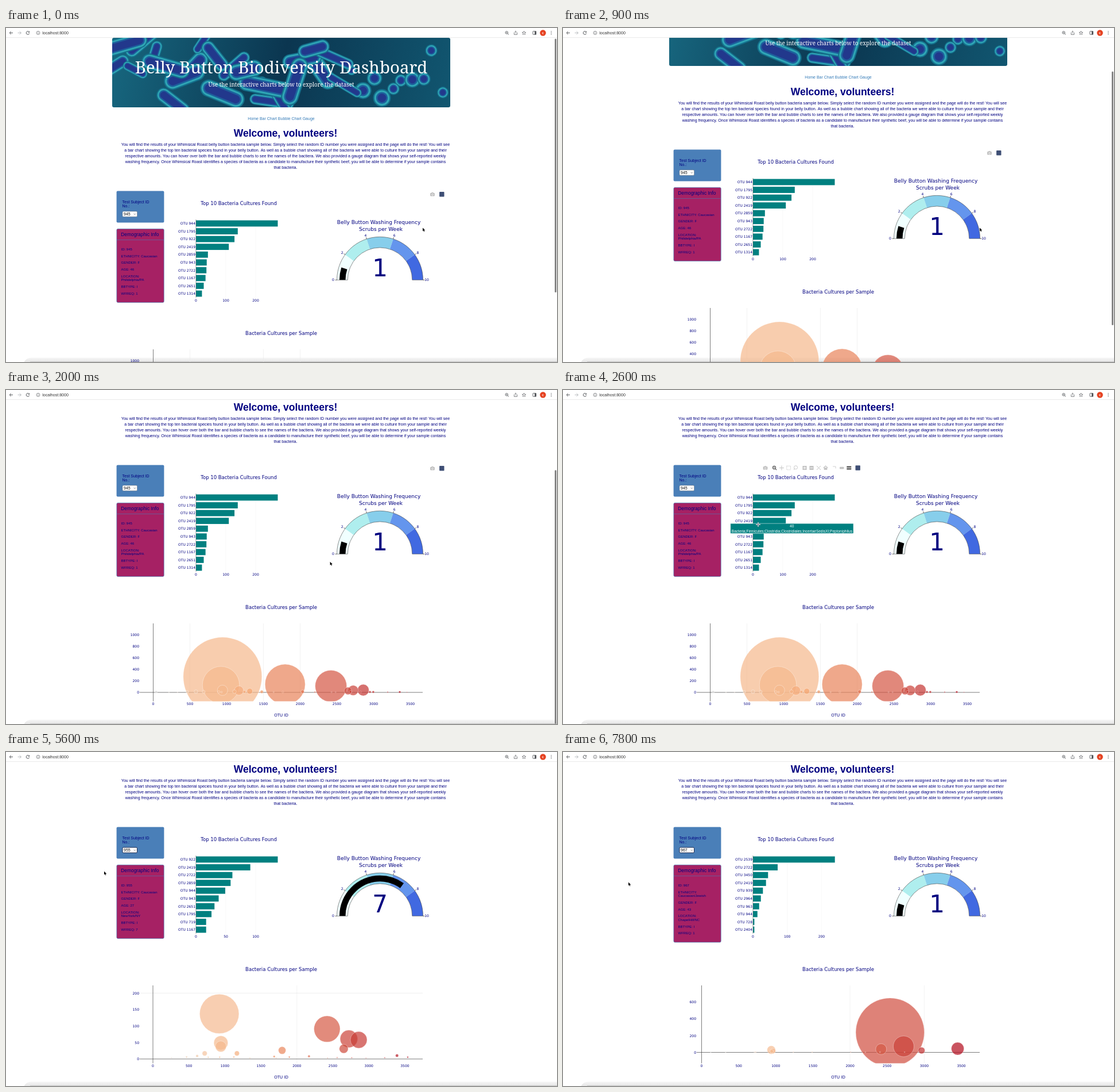
An HTML page with a canvas for the animation above (8 s loop, 960 px wide and 581 px high).

```html
<!DOCTYPE html>
<html lang="en">
<head>
<meta charset="utf-8">
<title>Dashboard</title>
<style>
  html, body { margin: 0; width: 100%; height: 100%; overflow: hidden; background: #fff; }
  canvas { display: block; width: 960px; height: 581px; }
</style>
</head>
<body>
<canvas id="stage"></canvas>
<script>
const W = 960, H = 581, LOOP = 8000, STEP = 100;
const SANS = '"Liberation Sans", Arial, sans-serif';
const PLOT = '"DejaVu Sans", Verdana, sans-serif';
const SERIF = '"Noto Serif", Georgia, serif';
const NAVY = '#000080', TEAL = '#008080', STEEL = '#4a7fb8', PLUM = '#a62164';
const canvas = document.getElementById('stage');
const g = canvas.getContext('2d');
const dpr = window.devicePixelRatio || 1;
canvas.width = W * dpr;
canvas.height = H * dpr;

const INTRO = [
  'You will find the results of your Whimsical Roast belly button bacteria sample below. Simply select the random ID number you were assigned and the page will do the rest! You will see',
  'a bar chart showing the top ten bacterial species found in your belly button. As well as a bubble chart showing all of the bacteria we were able to culture from your sample and their',
  'respective amounts. You can hover over both the bar and bubble charts to see the names of the bactiera. We also provided a gauge diagram that shows your self-reported weekly',
  'washing frequency. Once Whimsical Roast identifies a species of bacteria as a candidate to manufacture their synthetic beef, you will be able to determine if your sample contains',
  'that bacteria.'
];

function seeded(seed) {
  return () => {
    seed = (seed + 0x6d2b79f5) | 0;
    let r = Math.imul(seed ^ (seed >>> 15), 1 | seed);
    r = (r + Math.imul(r ^ (r >>> 7), 61 | r)) ^ r;
    return ((r ^ (r >>> 14)) >>> 0) / 4294967296;
  };
}

// minor cultures are spread over the id range with small counts
function minors(n, lo, hi, peak, seed) {
  const rnd = seeded(seed);
  return span(0, n - 1).map(i => {
    const jitter = i && i < n - 1 ? rnd() - 0.5 : 0;
    return [lo + (hi - lo) * (i + jitter) / (n - 1), 3 + peak * rnd() ** 2];
  });
}

const span = (a, b, skip = []) => {
  const out = [];
  for (let i = a; i <= b; i++) if (!skip.includes(i)) out.push(i);
  return out;
};

const SUBJECTS = [
  {
    id: 945, freq: 1, ethnicity: ['ETHNICITY: Caucasian'], age: 46, place: 'Philidelphia/PA',
    otu: [944, 1795, 922, 2419, 2859, 943, 2722, 1167, 2651, 1314],
    count: [274, 140, 129, 110, 40, 36, 35, 32, 26, 20],
    minor: minors(26, 41, 3454, 12, 5),
    barStep: 100, barScale: 0.52,
    x0: 256.5, xs: 0.128, y0: 679, ys: 0.1, yStep: 200, yMax: 1000, gridX: [500, 1500, 2000], gridY: []
  },
  {
    id: 955, freq: 7, ethnicity: ['ETHNICITY: Caucasian'], age: 27, place: 'NewYork/NY',
    otu: [922, 2419, 2722, 2859, 944, 943, 2651, 1795, 719, 1167],
    count: [137, 91, 61, 58, 49, 38, 31, 26, 17, 17],
    minor: minors(19, 41, 3540, 9, 8),
    barStep: 50, barScale: 1.04,
    x0: 256, xs: 0.1254, y0: 687, ys: 0.573, yStep: 50, yMax: 200, gridX: [2000], gridY: [200]
  },
  {
    id: 967, freq: 1, ethnicity: ['ETHNICITY:', 'Caucasian/Jewish'], age: 43, place: 'ChapelHill/NC',
    otu: [2539, 2722, 3450, 2419, 939, 2964, 963, 944, 728, 2404],
    count: [239, 72, 44, 38, 29, 23, 18, 13, 4, 4],
    minor: minors(8, 123, 2735, 0, 3),
    barStep: 100, barScale: 0.597,
    x0: 241.5, xs: 0.1293, y0: 675.5, ys: 0.1458, yStep: 200, yMax: 600, gridX: [2000, 3000], gridY: []
  }
];

const IDS = [...span(940, 978, [942, 951, 957, 965, 976, 977]), ...span(1233, 1250, [1240, 1241])];
const ROW = 11.414;

// time, then value or position
const SCROLL = [[300, 0], [900, 72], [1300, 129], [1700, 153]];
const CURSOR = [
  [1600, 727, 351], [2500, 340, 234], [2900, 340, 234], [3500, 216, 171], [3700, 216, 171],
  [4200, 218, 275], [4600, 218, 275], [5600, 172, 211], [5700, 172, 211],
  [6300, 215, 171], [6600, 215, 171], [7100, 217, 285], [7400, 217, 285], [7800, 115, 230]
];
const MENUS = [
  { open: 3600, blink: 4400, close: 4500, pick: 945 },
  { open: 6500, blink: 7300, close: 7400, pick: 955 }
];

const smooth = u => u * u * (3 - 2 * u);

function track(keys, t, ease = u => u) {
  if (t <= keys[0][0]) return keys[0].slice(1);
  for (let i = 1; i < keys.length; i++) {
    const a = keys[i - 1], b = keys[i];
    if (t <= b[0]) {
      const u = ease((t - a[0]) / (b[0] - a[0]));
      return a.slice(1).map((v, k) => v + (b[k + 1] - v) * u);
    }
  }
  return keys[keys.length - 1].slice(1);
}

// y is the middle of the capitals
function text(s, x, y, size, { align = 'left', font = SANS, color = NAVY, weight = '' } = {}) {
  g.font = `${weight} ${size}px ${font}`;
  g.textAlign = align;
  g.fillStyle = color;
  g.fillText(s, x, y + size * 0.36);
}

function line(color, width, ...pts) {
  g.strokeStyle = color;
  g.lineWidth = width;
  g.beginPath();
  for (let i = 0; i < pts.length; i += 2) g.lineTo(pts[i], pts[i + 1]);
  g.stroke();
}

function paint(fill, stroke, lw) {
  if (fill) { g.fillStyle = fill; g.fill(); }
  if (stroke) { g.strokeStyle = stroke; g.lineWidth = lw; g.stroke(); }
}

function box(x, y, w, h, r, fill, stroke, lw = 0.6) {
  g.beginPath();
  g.roundRect(x, y, w, h, r);
  paint(fill, stroke, lw);
}

function disc(x, y, r, fill, stroke, lw = 0.6) {
  g.beginPath();
  g.arc(x, y, r, 0, Math.PI * 2);
  paint(fill, stroke, lw);
}

function clipTo(x, y, w, h, r = 0) {
  g.beginPath();
  g.roundRect(x, y, w, h, r);
  g.clip();
}

function banner() {
  const rnd = seeded(21);
  g.save();
  clipTo(185, 17, 589, 121, 3);
  const bg = g.createLinearGradient(185, 17, 774, 138);
  bg.addColorStop(0, '#17677f');
  bg.addColorStop(0.5, '#0b3650');
  bg.addColorStop(1, '#115670');
  g.fillStyle = bg;
  g.fillRect(185, 17, 589, 121);
  g.lineCap = 'round';
  const layers = [[1, '#14708c'], [0.86, '#2fa6b5'], [0.66, '#1d5f9c'], [0.48, '#22388c']];
  for (let i = 0; i < 34; i++) {
    const x = 185 + 589 * ((i * 0.618) % 1), y = 17 + 121 * rnd();
    const round = x > 600, w = 16 + 16 * rnd();
    const a = (rnd() - 0.5) * 2.6, len = round ? 0.1 : 30 + 35 * rnd();
    const dx = len / 2 * Math.cos(a), dy = len / 2 * Math.sin(a);
    for (const [k, color] of layers) line(color, w * k, x - dx, y - dy, x + dx, y + dy);
  }
  g.restore();
  const white = { align: 'center', font: SERIF, color: '#fff' };
  text('Belly Button Biodiversity Dashboard', 479.5, 68.7, 29.4, white);
  text('Use the interactive charts below to explore the dataset', 479.5, 98.4, 9.85, white);
}

function sidebar(s, focused) {
  box(192.6, 283.4, 82.8, 55.2, 2, STEEL);
  text('Test Subject ID', 202.5, 302, 7);
  text('No.:', 202.5, 309.7, 7);
  box(203, 319, 25.5, 9.3, 1.5, '#fff', focused ? '#1b2b50' : '#777', focused ? 1 : 0.5);
  text(s.id, 205, 323.7, 7, { color: '#111' });
  line('#444', 0.6, 222.6, 322.8, 224.3, 324.6, 226, 322.8);

  const extra = (s.ethnicity.length - 1) * 6.6;
  box(192.9, 349.4, 82.3, 128 + extra, 2, PLUM, STEEL, 0.7);
  text('Demographic Info', 200.3, 359, 8.4);
  line(STEEL, 0.6, 193, 368.6, 275, 368.6);
  const items = [['ID: ' + s.id], s.ethnicity, ['GENDER: F'], ['AGE: ' + s.age],
    ['LOCATION:', s.place], ['BBTYPE: I'], ['WFREQ: ' + s.freq]];
  let y = 385;
  for (const rows of items) {
    rows.forEach((r, i) => text(r, 200.5, y + i * 6.6, 6));
    y += 11.65 + (rows.length - 1) * 6.6;
  }
}

function barChart(s) {
  text('Top 10 Bacteria Cultures Found', 405.5, 305, 8.5, { align: 'center', font: PLOT });
  for (let v = 0; v * s.barScale < 142; v += s.barStep) {
    const x = 331 + v * s.barScale;
    if (v) line('#f1f1f1', 0.5, x, 333, x, 469);
    text(v, x, 473.5, 6, { align: 'center', font: PLOT });
  }
  s.otu.forEach((id, i) => {
    const y = 340 + i * 13.56;
    g.fillStyle = TEAL;
    g.fillRect(331, y - 5.4, s.count[i] * s.barScale, 10.8);
    text('OTU ' + id, 330, y, 6, { align: 'right', font: PLOT });
  });
  line('#444', 0.5, 331, 333, 331, 469);
}

function gauge(s) {
  const cx = 651.5, cy = 438.3, rIn = 56.3, rOut = 75;
  const center = { align: 'center', font: PLOT };
  const angle = v => Math.PI * (1 + v / 10);
  const sector = (a, b, r0, r1, fill, stroke) => {
    g.beginPath();
    g.arc(cx, cy, r1, angle(a), angle(b));
    g.arc(cx, cy, r0, angle(b), angle(a), true);
    g.closePath();
    paint(fill, stroke, 0.6);
  };
  text('Belly Button Washing Frequency', 649.5, 337.7, 9, center);
  text('Scrubs per Week', 653, 349.5, 9, center);
  ['#f0ffff', '#afeeee', '#87ceeb', '#6495ed', '#4169e1'].forEach((c, i) => sector(i * 2, i * 2 + 2, rIn, rOut, c));
  sector(0, s.freq, 60, 70.6, '#000');
  sector(0, 10, rIn, rOut, null, '#444');
  for (let v = 0; v <= 10; v += 2) {
    const c = Math.cos(angle(v)), n = Math.sin(angle(v));
    line('#222', 0.7, cx + 75 * c, cy + 75 * n, cx + 78 * c, cy + 78 * n);
    text(v, cx + 81.5 * c, cy + 81.5 * n, 6, center);
  }
  text(s.freq, cx, 416.8, 42, center);
}

const REDS = [[0, 220, 220, 220], [0.2, 245, 195, 157], [0.4, 245, 160, 105], [1, 178, 10, 28]];
const shade = u => `rgba(${track(REDS, u).map(Math.round)},0.7)`;

function bubbleChart(s) {
  const px = v => s.x0 + v * s.xs, py = v => s.y0 - v * s.ys;
  const top = 559, bottom = 694.5, left = 235, right = 726;
  text('Bacteria Cultures per Sample', 479.5, 531, 8.5, { align: 'center', font: PLOT });
  for (const v of s.gridX) line('#eaeaea', 0.6, px(v), top, px(v), bottom);
  for (const v of s.gridY) line('#e4e4e4', 0.6, left, py(v), right, py(v));
  line('#444', 0.7, 233, s.y0, right, s.y0);
  line('#444', 0.7, s.x0, top, s.x0, bottom);

  const dots = [...s.otu.map((id, i) => [id, s.count[i]]), ...s.minor];
  const ids = dots.map(d => d[0]);
  const lo = Math.min(...ids), hi = Math.max(...ids);
  g.save();
  clipTo(left, top, right - left, bottom - top);
  for (const [id, n] of dots) {
    disc(px(id), py(n), n / 4, shade((id - lo) / (hi - lo)), 'rgba(255,255,255,0.7)', 0.5);
  }
  g.restore();

  for (let v = 0; v <= 3500; v += 500) text(v, px(v), 699, 6, { align: 'center', font: PLOT });
  for (let v = 0; v <= s.yMax; v += s.yStep) text(v, 232, py(v), 6, { align: 'right', font: PLOT });
  text('OTU ID', 479.5, 718, 7, { align: 'center', font: PLOT });
}

function camera(x, y) {
  box(x - 3.8, y - 2.3, 7.6, 5.4, 1, '#bdbdbd');
  box(x - 1.6, y - 3.3, 3.2, 2, 0.5, '#bdbdbd');
  disc(x, y + 0.4, 1.5, '#bdbdbd', '#fff', 0.7);
}

const badge = (x, y) => box(x - 4.2, y - 4.2, 8.4, 8.4, 0.8, '#3f4f75');

function plus(x, y, r, color, width) {
  line(color, width, x - r, y, x + r, y);
  line(color, width, x, y - r, x, y + r);
}

function barTools(y) {
  const c = '#c4c4c4', dark = '#5a5a5a';
  camera(352.5, y);
  disc(368, y - 0.5, 2.6, null, dark, 1.1);
  line(dark, 1.2, 370, y + 1.5, 372.2, y + 3.7);
  plus(368, y - 0.5, 1.4, dark, 0.7);
  plus(381, y, 4, c, 1);
  g.setLineDash([1.5, 1]);
  box(389.8, y - 3.3, 6.6, 6.6, 0, null, c, 0.9);
  g.setLineDash([]);
  disc(405.5, y - 0.8, 3, null, c, 0.9);
  line(c, 0.9, 403, y + 1, 402.6, y + 3.6);
  for (const x of [421, 433]) {
    box(x - 3.6, y - 3.6, 7.2, 7.2, 0.5, c);
    line('#fff', 1, x - 2.2, y, x + 2.2, y);
  }
  line('#fff', 1, 421, y - 2.2, 421, y + 2.2);
  for (const d of [-3.5, 3.5]) line(c, 1, 442, y - d, 449, y + d);
  line(c, 1.4, 453.8, y, 457.5, y - 3.4, 461.2, y);
  box(454.7, y - 0.4, 5.6, 3.8, 0, c);
  line(c, 0.8, 470, y - 2.5, 475, y - 2.5, 475, y + 1);
  box(482, y - 1.8, 7.5, 3.8, 1, c);
  for (const d of [-3, 0.5]) box(494.3, y + d, 8, 2.5, 0.4, dark);
  badge(513.7, y);
}

function tooltip() {
  box(291.8, 385.2, 214.2, 17.4, 0, TEAL, '#fff', 0.5);
  const o = { align: 'center', color: '#fff' };
  text('40', 398.7, 390, 6.5, o);
  text('Bacteria;Firmicutes;Clostridia;Clostridiales;IncertaeSedisXI;Peptoniphilus', 399, 398.2, 6.5, o);
}

function menu(m, t, cy) {
  const first = 171 - IDS.indexOf(m.pick) * ROW;
  const top = Math.max(18, first - 8.5), bottom = 580;
  g.save();
  g.shadowColor = 'rgba(0,0,0,0.3)';
  g.shadowBlur = 5 * dpr;
  box(198, top, 35.5, bottom - top, 3, '#e5e4e9');
  g.restore();

  g.save();
  clipTo(198, top, 35.5, bottom - top, 3);
  // the panels behind shine through
  g.filter = `blur(${8 * dpr}px)`;
  box(170, 130, 90, 60, 0, '#c3d7ed');
  box(170, 196, 90, 128, 0, '#f0b4dd');
  g.filter = 'none';
  clipTo(198, top, 35.5, 572 - top);
  const hot = t < m.blink ? Math.round((cy - first) / ROW) : -1;
  IDS.forEach((id, i) => {
    const y = first + i * ROW;
    if (i === hot) box(200.5, y - ROW / 2, 30.5, ROW, 2, '#3f83f6');
    const color = i === hot ? '#fff' : '#1c1c1e';
    text(id, 210, y, 7.2, { color });
    if (id === m.pick) line(color, 0.9, 203.4, y + 0.2, 205, y + 2.2, 207.8, y - 2.4);
  });
  g.restore();
  line('#222', 0.9, 213.4, 573.8, 215.6, 576, 217.8, 573.8);
}

function pointer(x, y, cross) {
  if (cross) {
    plus(x, y, 3.8, '#fff', 2);
    plus(x, y, 3.8, '#667', 0.9);
    return;
  }
  g.beginPath();
  for (const [a, b] of [[0, 0], [0, 6], [1.4, 4.8], [2.4, 7], [3.3, 6.6], [2.4, 4.5], [4.2, 4.4]]) g.lineTo(x - 1 + a, y - 3.5 + b);
  g.closePath();
  paint(null, '#fff', 1);
  paint('#000');
}

function toolbar() {
  const c = '#55585c', y = 8.5;
  g.fillStyle = '#fff';
  g.fillRect(0, 0, W, 17);
  line('#dcdcdc', 0.6, 0, 16.6, W, 16.6);
  const arrow = (x, d, color) => {
    line(color, 0.9, x - 3, y, x + 3, y);
    line(color, 0.9, x, y - 2.8, x + 2.9 * d, y, x, y + 2.8);
  };
  arrow(9, -1, c);
  arrow(23.5, 1, '#b5b8bb');
  g.beginPath();
  g.arc(38, y, 2.8, 0.3, 5.5);
  paint(null, c, 1);
  line(c, 0.9, 40.8, 5.5, 40.8, 7.6, 38.6, 7.6);
  disc(56, y, 2.9, null, c, 0.7);
  line(c, 0.7, 56, 8, 56, 10);
  line(c, 0.7, 56, 6.5, 56, 7.2);
  text('localhost:8000', 63.2, 8.6, 7.1, { color: '#333' });
  disc(872.3, 8, 2.3, null, c, 0.8);
  line(c, 0.9, 874, 9.7, 876, 11.6);
  plus(872.3, 8, 1.2, c, 0.6);
  line(c, 0.7, 886, 8, 885.3, 8, 885.3, 11.5, 890.5, 11.5, 890.5, 8, 889.8, 8);
  line(c, 0.7, 887.9, 9.6, 887.9, 5.2);
  line(c, 0.7, 886.5, 6.6, 887.9, 5.2, 889.3, 6.6);
  g.beginPath();
  for (let i = 0; i < 10; i++) {
    const r = i % 2 ? 1.5 : 3.4, a = -Math.PI / 2 + i * Math.PI / 5;
    g.lineTo(902.5 + r * Math.cos(a), 8.7 + r * Math.sin(a));
  }
  g.closePath();
  paint(null, c, 0.7);
  box(918, 5.7, 5.6, 5.6, 0.5, null, c, 0.9);
  box(921, 5.7, 2.6, 5.6, 0, c);
  disc(935.5, 8.5, 5.2, '#e5401f');
  text('K', 935.5, 8.6, 5.5, { align: 'center', color: '#fff' });
  for (const d of [-2.5, 0, 2.5]) disc(950, y + d, 0.65, c);
}

function bottomEdge() {
  const fade = g.createLinearGradient(0, 573, 0, 581);
  fade.addColorStop(0, '#f7f7f7');
  fade.addColorStop(1, '#e6e6e6');
  box(30, 573.5, W, 30, [14, 0, 0, 0], fade);
  line('#b4b4b4', 0.7, 42, 580.6, W, 580.6);
}

function draw(t) {
  const [scroll] = track(SCROLL, t);
  const [cx, cy] = track(CURSOR, t, smooth);
  const s = SUBJECTS[t < 4600 ? 0 : t < 7500 ? 1 : 2];
  const open = MENUS.find(m => t >= m.open && t < m.close);
  const pageY = cy + scroll;
  const inRow = !open && pageY > 283 && pageY < 505;
  const overBars = inRow && cx > 285 && cx < 525;
  const overGauge = inRow && cx > 535 && cx < 770;
  const inPlot = overBars && cx > 331 && cx < 475 && pageY > 333 && pageY < 469;

  g.setTransform(dpr, 0, 0, dpr, 0, 0);
  g.lineCap = 'butt';
  g.fillStyle = '#fff';
  g.fillRect(0, 0, W, H);
  bottomEdge();

  g.save();
  g.translate(0, -scroll);
  banner();
  text('Home Bar Chart Bubble Chart Gauge', 479.5, 157.5, 7, { align: 'center', color: '#337ab7' });
  text('Welcome, volunteers!', 487, 183, 17.5, { align: 'center', weight: 'bold' });
  INTRO.forEach((row, i) => text(row, 487, 202.5 + i * 10.05, 7.1, { align: 'center' }));
  sidebar(s, t >= 4500);
  barChart(s);
  gauge(s);
  bubbleChart(s);
  if (overGauge) { camera(743, 289.3); badge(759.3, 289.3); }
  if (overBars) barTools(288.5);
  if (inPlot && cx < 352 && Math.abs(pageY - 394) < 9) tooltip();
  g.restore();

  toolbar();
  if (t < 2300) box(956, 18.5 + scroll * 0.79, 3, 441.5, 1.5, '#858585');
  if (open) menu(open, t, cy);
  pointer(cx, cy, inPlot);
}

function tick() {
  const t = performance.now() % LOOP;
  draw(Math.floor(t / STEP) * STEP);
  requestAnimationFrame(tick);
}
tick();
</script>
</body>
</html>
```
